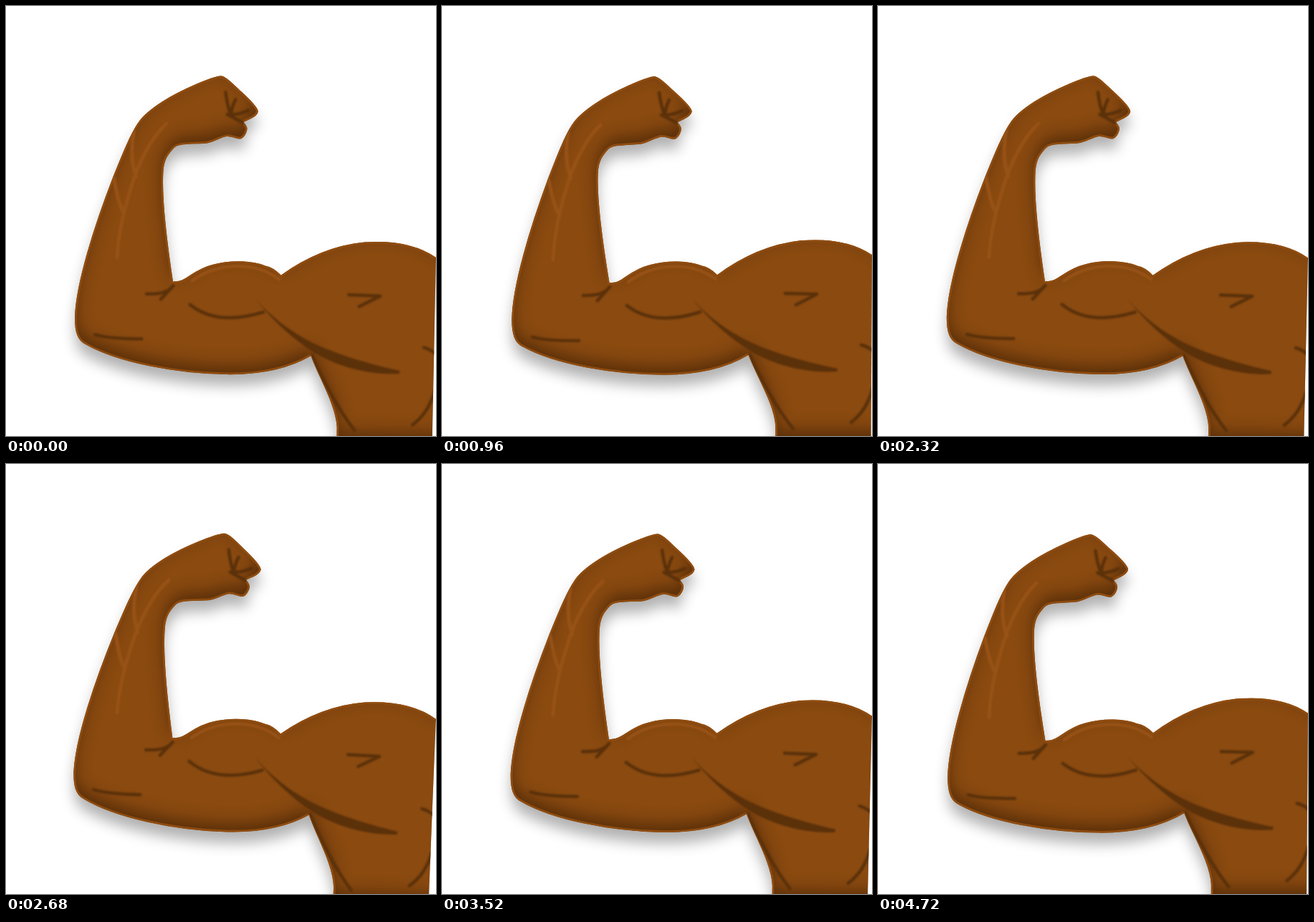
An HTML page with a canvas for the animation above (4.76 s loop, 600 px wide and 600 px high).

```html
<!DOCTYPE html>
<html lang="en">
<head>
<meta charset="utf-8">
<title>Flexing arm</title>
<style>
  html, body { margin: 0; width: 100%; height: 100%; overflow: hidden; background: #fff; }
  canvas { display: block; width: 100vw; height: 100vh; }
</style>
</head>
<body>
<canvas id="stage" width="600" height="600"></canvas>
<script>
const ctx = document.getElementById('stage').getContext('2d');

const LOOP = 4760, STEP = 40;
const PIVOT = { x: 348, y: 349 };
const MAX_TILT = 1.97 * Math.PI / 180;
// The tilt swings between rest and full; these are the turning times, first one at rest.
const TURNS = [-60, 70, 370, 670, 960, 1230, 1500, 1760, 1990, 2210, 2430, 2680, 2950,
               3210, 3410, 3620, 3830, 4040, 4250, 4430, 4700, 4830];

const SKIN = '#8a4a10', DARK = '#5b310a', LIGHT = '#975216';

const shoulder = 'M720 390 C660 375 640 366 600 348 C572 329 536 325 500 328 C455 333 415 353 384 376 ';
const biceps = 'C376 368 369 364 362 363 C345 356 315 355 290 362 C270 367 258 378 251 382 ' +
               'C245 386 239 387 233 387 ';
const innerArm = 'C226 345 215 270 217 232 C218 215 224 208 231 200 C237 193 250 194 276 192 ';
const fist = 'C286 191 295 184 305 182 C314 181 318 186 325 185 C331 182 335 172 332 168 ' +
             'C331 166 329 164 328 162 C337 157 347 154 348 147 C347 140 332 127 323 119 ' +
             'C312 109 302 99 296 99 ';
const outerArm = 'C284 100 241 119 215 136 C200 146 188 156 182 166 C171 183 161 209 149 240 ' +
                 'C123 310 99 390 98 437 C98 458 102 470 113 475 ';
const underArm = 'C158 500 240 514 310 514 C360 514 400 503 428 486 ';
const torso = 'C438 514 464 554 466 586 L466 603 L720 603 Z';

const body = new Path2D(shoulder + biceps + innerArm + fist + outerArm + underArm + torso);
const outside = new Path2D('M-300 -300 H1000 V1000 H-300 Z');
outside.addPath(body);

const crescent = new Path2D('M350 410 C372 434 398 453 428 468 C462 484 508 497 552 506 ' +
                            'L551 510 C512 513 466 502 433 483 C402 464 374 439 350 410 Z');

const veins = new Path2D('M221 166 C200 185 181 225 172 260 C160 300 156 330 155 354 ' +
                         'M176 178 C171 205 174 225 180 241 M149 243 C153 265 158 282 163 291');
const bicepsGlow = new Path2D('M260 385 C292 360 345 354 382 381');

const creases = new Path2D(
  'M303 121 Q306 142 311 152 M317 131 Q312 141 311 152 Q323 152 335 146 M306 152 L328 163 ' +
  'M197 404 C212 404 226 403 234 392 L217 411 ' +
  'M258 418 C285 439 320 440 360 427 ' +
  'M126 462 C145 467 170 467 191 467 ' +
  'M479 401 L523 402 L494 417 ' +
  'M585 473 Q594 475 602 482 M601 533 C595 555 586 569 571 581 ' +
  'M429 486 C440 512 467 562 490 590');

function tiltAt(time) {
  const next = TURNS.findIndex(turn => turn > time);
  const from = TURNS[next - 1];
  const part = (time - from) / (TURNS[next] - from);
  const eased = (1 - Math.cos(Math.PI * part)) / 2;
  return MAX_TILT * (next % 2 ? eased : 1 - eased);
}

function setShadow(color, blur = 0, offsetY = 0) {
  ctx.shadowColor = color;
  ctx.shadowBlur = blur;
  ctx.shadowOffsetY = offsetY;
}

function stroke(path, color, width) {
  ctx.strokeStyle = color;
  ctx.lineWidth = width;
  ctx.stroke(path);
}

function draw(time) {
  ctx.fillStyle = '#fff';
  ctx.fillRect(0, 0, 600, 600);
  ctx.save();
  ctx.translate(PIVOT.x, PIVOT.y);
  ctx.rotate(tiltAt(time));
  ctx.translate(-PIVOT.x, -PIVOT.y);
  ctx.lineCap = ctx.lineJoin = 'round';

  // The figure ends at a straight right-hand edge.
  ctx.clip(new Path2D('M-100 -100 H601 L600 340 L598 700 H-100 Z'));

  setShadow('rgba(0,0,0,.31)', 19, 16);
  ctx.fillStyle = SKIN;
  ctx.fill(body);
  setShadow('transparent');
  stroke(body, SKIN, 1.4);

  ctx.save();
  ctx.clip(body);
  setShadow('rgba(40,18,0,.53)', 22, -10);
  ctx.fill(outside, 'evenodd');
  ctx.restore();

  stroke(body, '#8f4c10', 1.4);
  ctx.clip(body);
  stroke(body, '#8f4c10', 4);

  ctx.filter = 'blur(1px)';
  stroke(veins, LIGHT, 5);
  stroke(bicepsGlow, LIGHT, 4.5);
  stroke(creases, DARK, 4.5);
  ctx.fillStyle = DARK;
  ctx.fill(crescent);
  ctx.restore();
}

const start = performance.now();
function tick() {
  const time = (performance.now() - start) % LOOP;
  draw(Math.floor(time / STEP) * STEP);
  requestAnimationFrame(tick);
}
tick();
</script>
</body>
</html>
```
